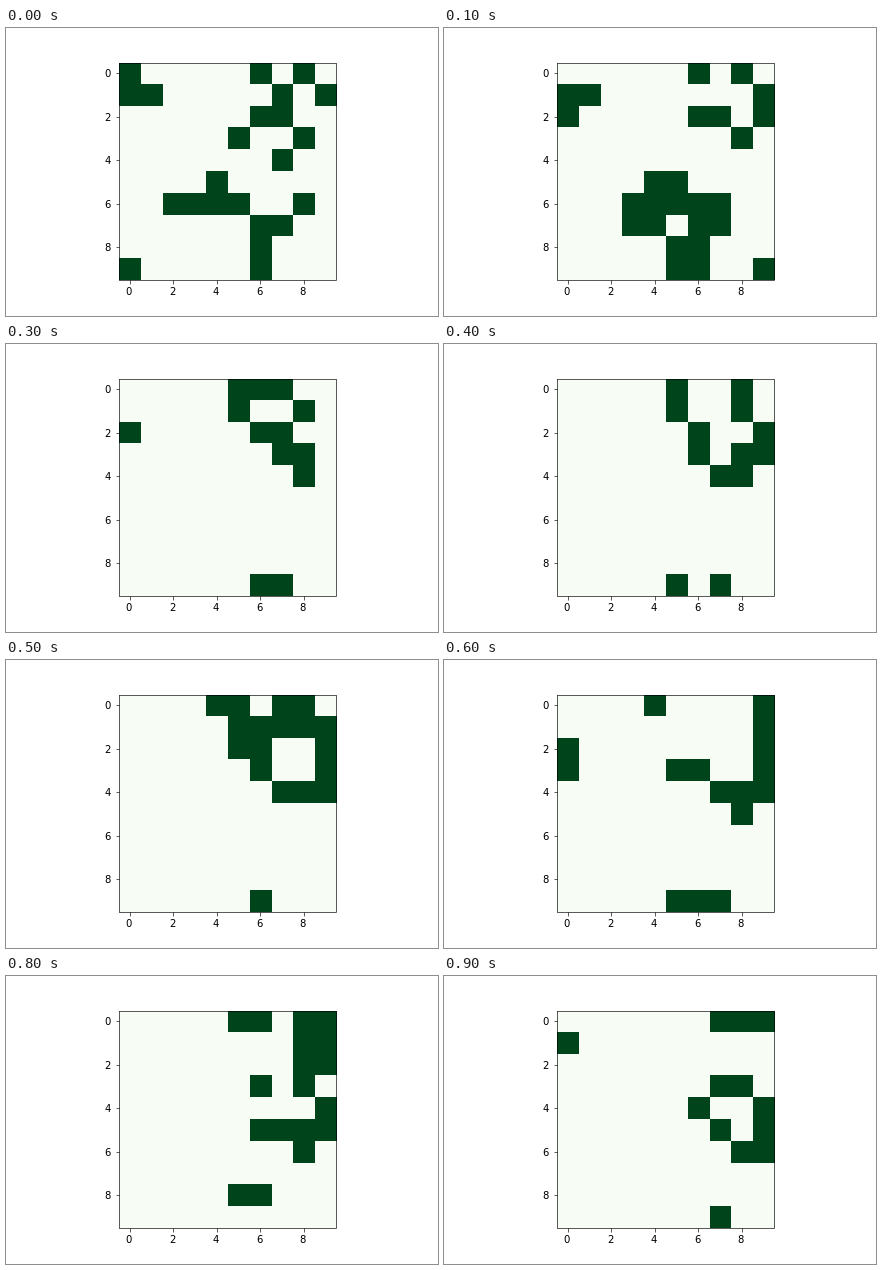
Animation, 432 px wide and 288 px high, one loop 1000 ms. Source, as an HTML page:

```html
<!DOCTYPE html>
<html lang="en">
<head>
<meta charset="utf-8">
<title>Game of Life on a torus</title>
<style>
  html, body { margin: 0; width: 100%; height: 100%; overflow: hidden; background: #fff; }
  svg { display: block; width: 432px; height: 288px; }
  text { font: 10px "DejaVu Sans", sans-serif; fill: #000; }
  .line { fill: none; stroke: #000; stroke-opacity: .8; stroke-width: .8; }
</style>
</head>
<body>
<svg viewBox="0 0 432 288">
  <rect x="113" y="35" width="218" height="218" fill="#f7fcf5"/>
  <path id="cells" fill="#00441b" shape-rendering="crispEdges"/>
  <rect class="line" x="113.5" y="35.5" width="217" height="217"/>
  <path id="ticks" class="line"/>
  <g id="labels"></g>
</svg>
<script>
const N = 10, STEP = 100, GENERATIONS = 10;
const SEED = [
  "#.....#.#.",
  "##.....#.#",
  "......##..",
  ".....#..#.",
  ".......#..",
  "....#.....",
  "..####..#.",
  "......##..",
  "......#...",
  "#.....#..."
];
const $ = id => document.getElementById(id);
const edgeX = i => Math.round(113 + 21.8 * i);
const edgeY = i => Math.max(35, Math.round(34 + 21.8 * i));

function evolve(grid) {
  const at = (r, c) => grid[(r + N) % N][(c + N) % N];
  return grid.map((row, r) => row.map((alive, c) => {
    let sum = -alive;
    for (let dr = -1; dr <= 1; dr++)
      for (let dc = -1; dc <= 1; dc++) sum += at(r + dr, c + dc);
    return +(sum === 3 || (alive && sum === 2));
  }));
}

function outline(grid) {
  let d = "";
  grid.forEach((row, r) => row.forEach((alive, c) => {
    if (alive) d += `M${edgeX(c)} ${edgeY(r)}H${edgeX(c + 1)}V${edgeY(r + 1)}H${edgeX(c)}Z`;
  }));
  return d;
}

function addLabel(value, x, y) {
  const t = document.createElementNS("http://www.w3.org/2000/svg", "text");
  t.setAttribute("x", Math.round(x));
  t.setAttribute("y", Math.round(y));
  t.textContent = value;
  $("labels").append(t);
}

let ticks = "";
for (let v = 0; v < N; v += 2) {
  const x = 112.68 + 21.744 * (v + .5);
  const y = 34.56 + 21.744 * (v + .5);
  ticks += `M${Math.round(x) + .5} 252.5v4M113.5 ${Math.round(y) + .5}h-3`;
  addLabel(v, x - 3.18, 267);
  addLabel(v, 99, y + 3.65);
}
$("ticks").setAttribute("d", ticks);

const paths = [];
let grid = SEED.map(row => [...row].map(ch => +(ch === "#")));
for (let g = 0; g < GENERATIONS; g++) {
  paths.push(outline(grid));
  grid = evolve(grid);
}

const start = performance.now();
let shown = -1;
function draw() {
  const g = Math.floor((performance.now() - start) / STEP) % GENERATIONS;
  if (g !== shown) $("cells").setAttribute("d", paths[shown = g]);
  requestAnimationFrame(draw);
}
draw();
</script>
</body>
</html>
```
